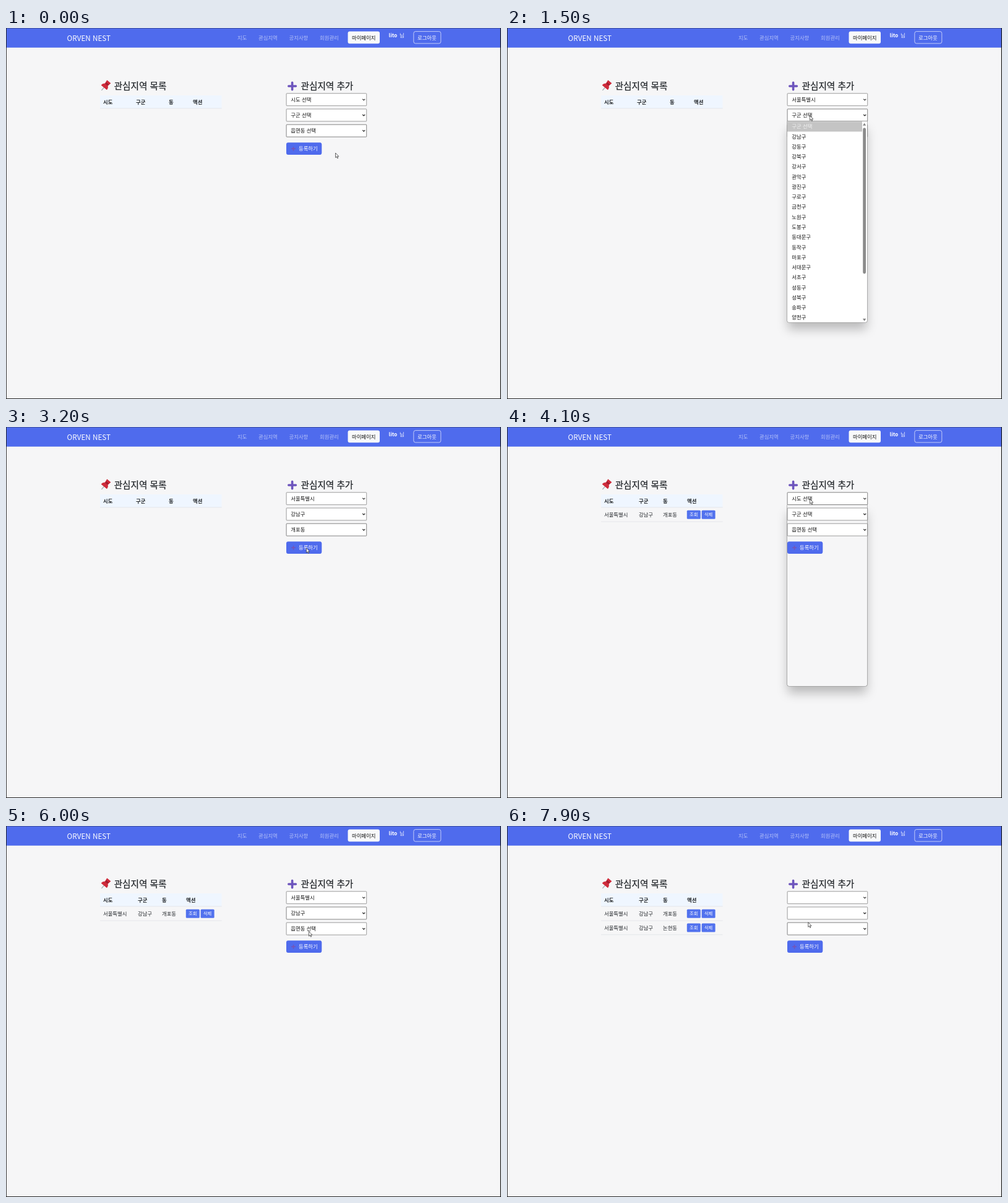
Animation, 800 px wide and 600 px high, one loop 8 s. Source, as an HTML page:

```html
<!DOCTYPE html>
<html lang="ko">
<head>
<meta charset="utf-8">
<title>관심지역</title>
<style>
html, body { margin: 0; width: 100%; height: 100%; overflow: hidden; background: #f6f6f7; }
svg { position: absolute; left: 0; top: 0; font: 8.35px "Noto Sans CJK KR", "Noto Sans CJK", sans-serif; }
text { white-space: pre; }
.brand { font-size: 11.7px; }
.title { font-size: 14.6px; stroke: #212529; stroke-width: .25px; }
.small { font-size: 7.3px; }
.bold { font-weight: 700; }
#panel {
  position: absolute; left: 453px; width: 129px; border-radius: 0 0 3px 3px;
  box-shadow: 0 0 0 .6px #8b8b8b, 0 12px 17px -1px rgba(0,0,0,.25);
}
</style>
</head>
<body>
<svg id="page" width="800" height="600"></svg>
<div id="panel"></div>
<svg width="800" height="600">
  <g id="options"></g>
  <path id="cursor" d="M0 0V7.6L1.8 6L3 8.8L4.2 8.3L3 5.6H5.3Z" fill="#fff" stroke="#333" stroke-width=".75"/>
</svg>
<script>
const LOOP = 8000, STEP = 100, ROW = 16.26;
const BLUE = '#4f6bed', INK = '#212529';
const PROMPTS = ['시도 선택', '구군 선택', '읍면동 선택'];
const OPTIONS = [
  '서울특별시 인천광역시 대전광역시 대구광역시 광주광역시 부산광역시 울산광역시 세종특별자치시 경기도 강원도 충청북도 충청남도 전라북도 전라남도 경상북도 경상남도 제주특별자치도',
  '강남구 강동구 강북구 강서구 관악구 광진구 구로구 금천구 노원구 도봉구 동대문구 동작구 마포구 서대문구 서초구 성동구 성북구 송파구 양천구',
  '개포동 논현동 대치동 도곡동 삼성동 세곡동 수서동 신사동 압구정동 역삼동 율현동 일원동 자곡동 청담동'
].map((names, i) => [PROMPTS[i], ...names.split(' ')]);

// Each round opens and picks from the three menus, then submits a row
const ROUNDS = [
  { opens: [700, 1400, 2300], picks: [1100, 1900, 2800], choice: [1, 1, 1], submit: 3600 },
  { opens: [4100, 5000, 6400], picks: [4700, 5800, 7000], choice: [1, 1, 2], submit: 7700 }
];
const BLANK_TIME = 300;
const MENUS = ROUNDS.flatMap(({ opens, picks, choice }) =>
  opens.map((open, index) => ({ index, open, pick: picks[index], option: choice[index] })));

const selectTop = i => 105.5 + i * 25.2;
const menuTop = i => selectTop(i) + 20.6;
const onSelect = i => [489.5, selectTop(i) + 11];
const onOption = (i, option) => [489.5, menuTop(i) + ROW * (option + .3)];
const BUTTON = [484, 195];

// Pointer stops as [time, [x, y]], derived from the clicks
const PATH = [
  [0, [532.5, 202]], [500, onSelect(0)],
  ...ROUNDS.flatMap(({ opens, picks, choice, submit }) => [
    ...opens.flatMap((open, i) => [
      [open - STEP, onSelect(i)], [open + STEP, onSelect(i)],
      [open + 4 * STEP, onOption(i, choice[i])], [picks[i], onOption(i, choice[i])]
    ]),
    [submit - 2 * STEP, BUTTON], [submit - STEP, BUTTON]
  ]),
  [LOOP + 2 * STEP, onSelect(0)]
];

const $ = id => document.getElementById(id);
const text = (s, x, cy, fill = INK, cls = '', size = 8.35) =>
  `<text x="${x}" y="${cy + size * .37}" fill="${fill}" class="${cls}">${s}</text>`;
const box = (x, y, w, h, fill, r = 0, stroke = 'none') =>
  `<rect x="${x}" y="${y}" width="${w}" height="${h}" rx="${r}" fill="${fill}" stroke="${stroke}" stroke-width=".8"/>`;
const plus = (x, y, r, width, color) =>
  `<path d="M${x - r} ${y}h${2 * r}M${x} ${y - r}v${2 * r}" stroke="${color}" stroke-width="${width}" stroke-linecap="round"/>`;

function header() {
  let x = 374, links = '';
  for (const s of ['지도', '관심지역', '공지사항', '회원관리']) {
    links += text(s, x, 16, '#b6c2f8');
    x += s.length * 7.7 + 18.7;
  }
  return box(0, 0, 800, 31.7, BLUE) + text('ORVEN NEST', 98.5, 16.5, '#fff', 'brand', 11.7) + links +
    box(552.5, 5.6, 51.5, 19.6, '#f8f9fa', 3) + text('마이페이지', 559, 15.6, '#111') +
    text('lito', 618.5, 12.3, '#fff', 'bold') + text('님', 636, 12.3, '#fff') +
    box(658.8, 5.6, 44, 19.4, 'none', 3, '#dfe4fc') + text('로그아웃', 665, 15.6, '#fff');
}

function pin() {
  return `<g transform="translate(161.500 92.500) rotate(40)">
    <path d="M0 4V11" stroke="#9aa3ab" stroke-width="1.100"/>
    <path d="M-3.500 -7H3.500L2.500 -1Q5.500 1 5.500 4.500H-5.500Q-5.500 1 -2.500 -1Z" fill="#cf2b3b" stroke="#cf2b3b" stroke-linejoin="round"/>
    <path d="M-2.800 -4H2.800L2.500 -1H-2.500Z" fill="#9f1d31"/></g>`;
}

function table(rows) {
  const xs = rows.length ? [157, 213, 252, 291] : [157, 210, 263, 302];
  const line = y => box(152, y, 196.5, .7, '#dcdfe4');
  const action = (s, x, y) => box(x, y - 7, 22, 14, '#5272ee', 1.5) + text(s, x + 4.3, y, '#fff', 'small', 7.3);
  return box(152, 109, 196.5, 21, '#eff6ff') + line(129.6) +
    ['시도', '구군', '동', '액션'].map((s, i) => text(s, xs[i], 119.5, INK, 'bold')).join('') +
    rows.map((cells, i) => {
      const y = 141.7 + i * 22.8;
      return cells.map((s, k) => text(s, xs[k], y)).join('') +
        action('조회', 290.8, y) + action('삭제', 314.6, y) + line(y + 11);
    }).join('');
}

function form(values, focused) {
  return values.map((s, i) => {
    const y = selectTop(i);
    return box(453.1, y + .3, 129.6, 19.9, '#fff', .8, i === focused ? '#666' : '#858585') +
      text(s, 460.3, y + 10.2, '#111') +
      `<path d="M576.200 ${y + 9.3}l2 2l2 -2" fill="none" stroke="#222" stroke-width="1.100"/>`;
  }).join('') +
    box(453, 185.3, 57.3, 19.8, BLUE, 3) + plus(464.5, 195.3, 2.9, 1.5, '#7654b5') + text('등록하기', 473, 195.3, '#fff');
}

function pointerAt(t) {
  const i = PATH.findIndex(([time]) => time > t);
  const [t0, from] = PATH[i - 1], [t1, to] = PATH[i];
  const k = (t - t0) / (t1 - t0), eased = k * k * (3 - 2 * k);
  return from.map((v, axis) => v + (to[axis] - v) * eased);
}

function optionRow(s, i, top, hover, width) {
  const y = top + i * ROW;
  const idle = i === 0 && hover < 1, active = i > 0 && i === hover;
  const back = idle ? '#c4c4c4' : active ? '#4661c5' : 'none';
  const ink = idle ? '#f2f2f2' : active ? '#fff' : i ? '#111' : '#858585';
  return box(453, y, width, ROW, back) + text(s, 460.3, y + ROW / 2 - .1, ink);
}

function scrollbar(top, height) {
  const end = top + height;
  return box(575.2, top + 10.2, 4.8, 236, '#8b8b8b', 2.4) +
    `<path d="M575 ${top + 6.5}l2.600 -4l2.600 4ZM575 ${end - 6.5}l2.600 4l2.600 -4Z" fill="#858585"/>`;
}

function drawMenu(t, pointerY) {
  const menu = MENUS.find(m => t >= m.open && t < m.pick);
  const panel = $('panel');
  panel.style.display = menu ? 'block' : 'none';
  $('options').innerHTML = '';
  if (!menu) return;
  const items = OPTIONS[menu.index], top = menuTop(menu.index), height = items.length * ROW;
  const hollow = t < menu.open + STEP, scrolls = items.length > 18;
  panel.style.top = top + 'px';
  panel.style.height = height + 'px';
  panel.style.background = hollow ? 'none' : '#fff';
  if (hollow) return;
  const hover = Math.floor((pointerY - top) / ROW);
  $('options').innerHTML = items.map((s, i) => optionRow(s, i, top, hover, scrolls ? 121 : 129)).join('') +
    (scrolls ? scrollbar(top, height) : '');
}

function draw(t) {
  const done = ROUNDS.filter(r => r.submit <= t);
  const lastSubmit = done.length ? done[done.length - 1].submit : -LOOP;
  const values = t - lastSubmit < BLANK_TIME ? ['', '', ''] : [...PROMPTS];
  let focused = 2;
  for (const { index, open, pick, option } of MENUS) {
    if (open <= t) focused = index;
    if (pick <= t && pick > lastSubmit) values[index] = OPTIONS[index][option];
  }
  const rows = done.map(r => r.choice.map((option, i) => OPTIONS[i][option]));

  $('page').innerHTML = header() +
    pin() + text('관심지역 목록', 174.7, 93.6, INK, 'title', 14.6) + table(rows) +
    plus(462.6, 94, 5.8, 3.6, '#6d55bd') + text('관심지역 추가', 476.6, 93.6, INK, 'title', 14.6) + form(values, focused) +
    box(0, 0, 800, .6, '#333c70') + box(0, 0, .9, 600, '#222') + box(798.8, 0, 1.2, 600, '#222') + box(0, 599, 800, 1, '#222');
  const [x, y] = pointerAt(t);
  drawMenu(t, y);
  $('cursor').setAttribute('transform', `translate(${x} ${y})`);
}

let shown = -1;
const start = performance.now();
function tick() {
  const t = Math.floor((performance.now() - start) % LOOP / STEP) * STEP;
  if (t !== shown) draw(shown = t);
  requestAnimationFrame(tick);
}
tick();
</script>
</body>
</html>
```
